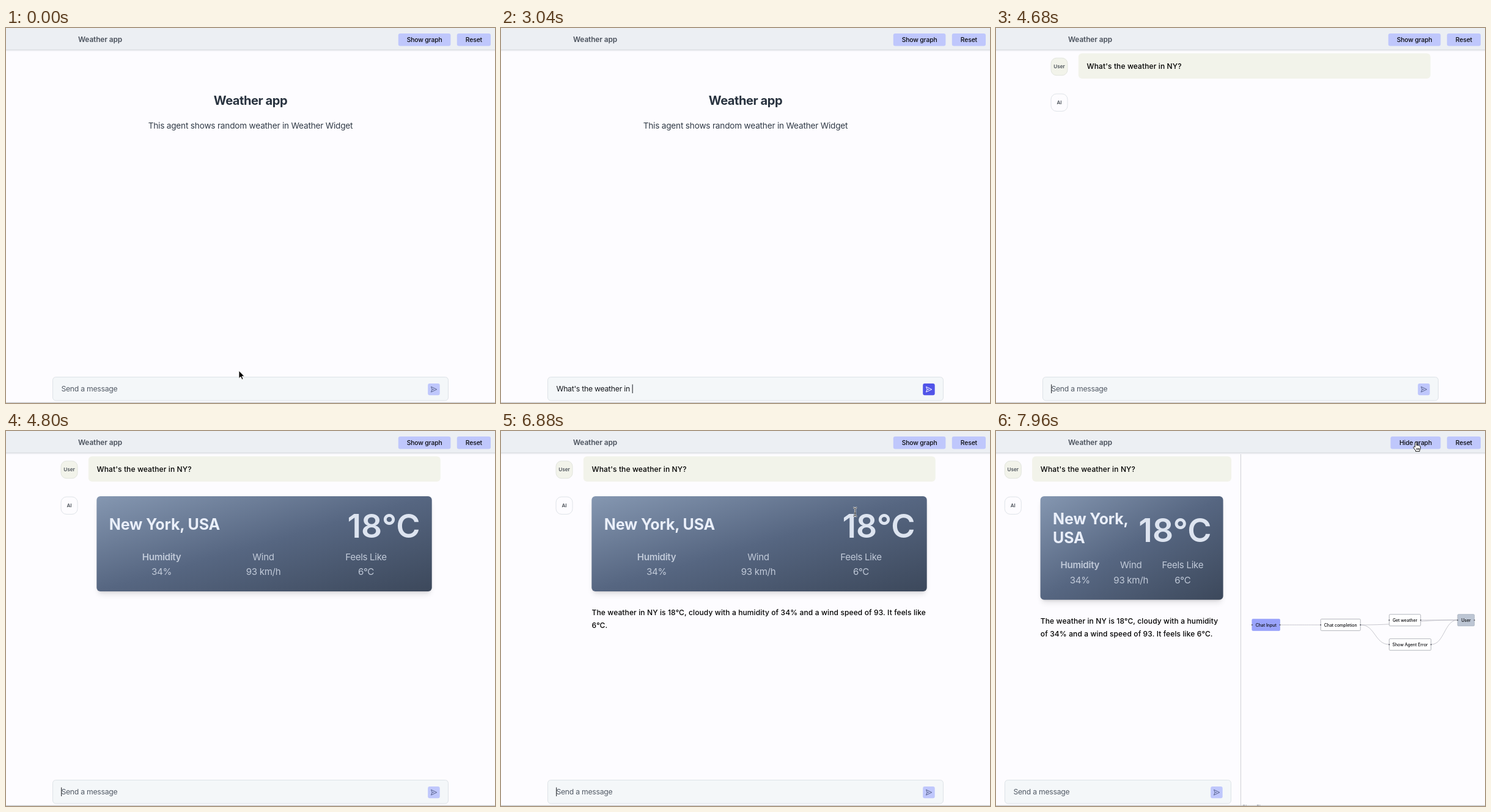
An HTML page that plays this animation: 800 px wide and 615 px high, repeating every 8 s.

```html
<!DOCTYPE html>
<html lang="en">
<head>
<meta charset="utf-8">
<title>Weather app</title>
<style>
html, body { margin: 0; width: 100%; height: 100%; overflow: hidden; background: #fdfcff; }
svg { display: block; width: 100%; height: 100%; }
text { font-family: Inter, sans-serif; white-space: pre; letter-spacing: -.02em; }
.title { letter-spacing: -.023em; }
.lead { letter-spacing: -.014em; }
.head { letter-spacing: -.006em; }
.body { letter-spacing: .12px; }
.btn { letter-spacing: -.015em; }
.tiny { letter-spacing: 0; }
.edge { fill: none; stroke: #b1b1b9; stroke-width: .7; }
.far { filter: blur(5px); }
.near { filter: blur(2px); }
</style>
</head>
<body>
<svg id="stage" viewBox="0 0 800 615" preserveAspectRatio="none"></svg>
<script>
const LOOP = 8000;
const FOCUS = 320, TYPE = 560, SUBMIT = 3680, AI = 3720, CARD = 4760, SPLIT = 7520;
const QUESTION = "What's the weather in NY?";
const WIDE_LINES = [
  'The weather in NY is 18°C, cloudy with a humidity of 34% and a wind speed of 93. It feels like',
  '6°C.'
];
const NARROW_LINES = [
  'The weather in NY is 18°C, cloudy with a humidity',
  'of 34% and a wind speed of 93. It feels like 6°C.'
];
const TYPING = [[TYPE, 0], [1280, 11], [1400, 11], [2600, 22], [3080, 22], [3440, 25]];
const STREAM = [[5680, 0], [6440, 22]];
const MOUSE = [
  [0, 381, 562], [FOCUS, 380, 588], [5000, 380, 588], [5560, 446.5, 315.5],
  [6240, 446.5, 315.5], [6880, 579, 133], [7280, 688, 22.4]
];

// y is the middle of the capital letters
const text = (x, y, s, size, o = {}) =>
  `<text x="${x}" y="${y + size * .364}" font-size="${size}" font-weight="${o.w || 400}"
    fill="${o.c || '#090a0d'}" text-anchor="${o.a || 'start'}" class="${o.k || ''}" id="${o.id || ''}">${s}</text>`;
const box = (x, y, w, h, r, fill, stroke = 'none', extra = '') =>
  `<rect x="${x}" y="${y}" width="${w}" height="${h}" rx="${r}" fill="${fill}" stroke="${stroke}" ${extra}/>`;
const group = (id, s) => `<g id="${id}">${s}</g>`;

const button = (x, w, label) =>
  box(x, 9, w, 20.5, 3.2, '#bfc7fc') + text(x + w / 2, 19.3, label, 10.4, { w: 500, a: 'middle', k: 'btn' });

const badge = (x, y, label, fill, stroke) =>
  box(x + .5, y + .5, 27, 28.5, 9, fill, stroke) +
  text(x + 14, y + 14.6, label, 8.1, { w: 600, c: '#4a5058', a: 'middle', k: 'tiny' });

function inputBar(id, x, w) {
  const b = x + w - 33.8;
  return group(id,
    box(x + .5, 572.5, w - 1, 38.5, 5, '#f4f7f9', '#dde3e7') +
    text(x + 14.4, 592, 'Send a message', 12.2, { c: '#535b66', id: id + 'Text' }) +
    box(b, 583, 19.5, 19.3, 3, '#bfc7fc', 'none', `id="${id}Send"`) +
    `<path id="${id}Icon" transform="translate(${b + 5} 588)" d="M.3.3 9.6 4.7.3 9.1 2 4.7ZM2 4.7H5.2"
      fill="none" stroke="#59638f" stroke-width="1" stroke-linejoin="round"/>`);
}

function weatherCard(id, x, w, h, titles, temp, cols, row) {
  const shadow = (dy, cls) => box(x + 2, 109 + dy, w - 4, h - 4, 6, '#000', 'none', `opacity=".1" class="${cls}"`);
  const label = (i, s, v, weight) =>
    text(cols[i], row, s, 15.1, { w: weight, c: '#c1cad9', a: 'middle' }) +
    text(cols[i], row + 24.4, v, 15.1, { c: '#c1cad9', a: 'middle' });
  return group(id,
    shadow(7, 'far') + shadow(2.75, 'near') +
    box(x, 107, w, h, 6, 'url(#sky)') +
    titles.map(([s, y]) => text(x + 20.5, y, s, 25, { w: 700, c: '#eaeffa', k: 'head' })).join('') +
    text(x + w - 19, temp, '18°C', 53.4, { w: 600, c: '#dde4f0', a: 'end', k: 'tiny' }) +
    label(0, 'Humidity', '34%', 600) + label(1, 'Wind', '93 km/h') + label(2, 'Feels Like', '6°C'));
}

function chat(id, x, bubbleW, card, lines, y) {
  const para = (s, py, lineId) => text(x + 59, py, s, 12, { w: 450, c: '#000', k: 'body', id: lineId });
  return group(id,
    badge(x, 48.7, 'User', '#f2f3ea', '#e2e5de') +
    box(x + 45.3, 41.5, bubbleW, 41.5, 6, '#f2f3ea') +
    para(QUESTION, 62.5) +
    group(id + 'Ai', badge(x, 107.5, 'AI', '#fdfcff', '#dfe3e8')) + card +
    lines.map((s, i) => para(s, y + i * 20.6, id + 'Line' + i)).join(''));
}

function graph() {
  const node = (x, y, w, s, fill = '#fff', stroke = '#a3a5ac') =>
    box(x, y, w, 19, 1.5, fill, stroke, 'stroke-width=".8"') +
    text(x + w / 2, y + 9.7, s, 6.9, { w: 450, c: '#0c0d10', a: 'middle', k: 'tiny' }) +
    [x, x + w].map(cx => `<circle cx="${cx}" cy="${y + 9.6}" r="1" fill="#53565e"/>`).join('');
  const edge = (x1, y1, x2, y2) => {
    const m = (x1 + x2) / 2;
    return `<path class="edge" d="M${x1} ${y1}C${m} ${y1} ${m} ${y2} ${x2} ${y2}"/>`;
  };
  return group('graph',
    box(400, 36, 1, 578, 0, '#d0d1d6') +
    edge(465, 318, 531, 318) + edge(597, 318, 755, 310) + edge(597, 318, 643, 350) +
    edge(695, 310, 755, 310) + edge(712, 350, 755, 310) +
    node(418.9, 308.4, 45.6, 'Chat Input', '#99a3fb', '#99a3fb') +
    node(531.2, 308.4, 65, 'Chat completion') +
    node(643.3, 300.7, 51.4, 'Get weather') +
    node(643.3, 340.7, 68.4, 'Show Agent Error') +
    node(755.2, 300.7, 27.4, 'User', '#bdc6d4', '#a5aebc') +
    text(403, 616.2, 'Show Fl', 8, { c: '#60636a', k: 'tiny' }));
}

const cursors =
  group('arrow', `<path d="M0 0V12.6L2.9 9.9 5 14.5 7.1 13.5 5.1 9.1H9Z" fill="#000" stroke="#fff" stroke-width=".9"/>`) +
  group('beam', ['#fff', '#222'].map((c, i) =>
    `<path d="M-3-7Q0-7 0-5Q0-7 3-7M0-5V5M-3 7Q0 7 0 5Q0 7 3 7M-1.5 2H1.5" fill="none" stroke="${c}" stroke-width="${i ? 1 : 2.4}"/>`).join('')) +
  group('hand', `<path d="M-2.5 4V-2.5Q-2.5-4-1.3-4T0-2.5V1Q1.2 0 2.2 1.4Q3.5.6 4.4 2Q6.4 1.4 6.4 3.4V6
    Q6.2 8 5 9.2V11H-1.5V9.6L-5 5.2Q-5.4 3.4-3.8 3.4ZM.4 5.5V8.6M2.4 5.5V8.6M4.2 5.5V8.6"
    fill="#fff" stroke="#111" stroke-width=".95" stroke-linejoin="round"/>`);

const stage = document.getElementById('stage');
stage.innerHTML =
  `<defs><linearGradient id="sky" x1="0" y1="0" x2="1" y2="1">
    <stop offset="0" stop-color="#8597b1"/><stop offset=".5" stop-color="#566681"/><stop offset="1" stop-color="#3c485b"/>
  </linearGradient></defs>` +
  box(0, 0, 800, 615, 0, '#fdfcff') +
  group('intro',
    text(400, 118.5, 'Weather app', 20.1, { w: 700, c: '#28323f', a: 'middle', k: 'title' }) +
    text(400, 159.8, 'This agent shows random weather in Weather Widget', 13.6, { c: '#303a46', a: 'middle', k: 'lead' })) +
  chat('wide', 89.5, 576,
    weatherCard('wideCard', 148.3, 548.4, 156, [['New York, USA', 153]], 155.5, [254.5, 421, 589], 206.4),
    WIDE_LINES, 298) +
  chat('narrow', 13.8, 326,
    weatherCard('narrowCard', 72.6, 299, 169.8, [['New York,', 144.2], ['USA', 175.2]], 162.3, [137.3, 220.7, 305.3], 220),
    NARROW_LINES, 312) +
  graph() +
  inputBar('bar', 76, 648) + inputBar('barNarrow', 14, 371) +
  box(90.2, 584.5, 1, 14.5, 0, '#15171c', 'none', 'id="caret"') +
  box(0, 613.8, 800, 1.2, 0, '#c4c5c9') +
  box(0, 36, 800, 2, 0, '#efeff3') + box(0, 35, 800, 1.2, 0, '#d7dade') + box(0, 0, 800, 35.2, 0, '#eceff3') +
  text(118, 19.2, 'Weather app', 11.8, { w: 600, c: '#4a515c', k: 'head' }) +
  group('showBtn', button(641.8, 85.6, 'Show graph')) +
  group('hideBtn', button(645.5, 81.9, 'Hide graph')) +
  button(737.8, 55.2, 'Reset') +
  group('mouse', cursors);

const el = {};
for (const n of stage.querySelectorAll('[id]')) if (n.id) el[n.id] = n;
const show = (id, on) => el[id].setAttribute('display', on ? 'inline' : 'none');

// linear interpolation through rows of [time, value...]
function track(rows, t) {
  if (t <= rows[0][0]) return rows[0].slice(1);
  const i = rows.findIndex(r => r[0] > t);
  if (i < 0) return rows[rows.length - 1].slice(1);
  const a = rows[i - 1], b = rows[i], k = (t - a[0]) / (b[0] - a[0]);
  return a.slice(1).map((v, j) => v + (b[j + 1] - v) * k);
}

function drawInput(t) {
  const typed = t < SUBMIT ? QUESTION.slice(0, Math.floor(track(TYPING, t)[0])) : '';
  el.barText.textContent = typed || 'Send a message';
  el.barText.setAttribute('fill', typed ? '#14171c' : '#535b66');
  el.barSend.setAttribute('fill', typed ? '#5154e8' : '#bfc7fc');
  el.barIcon.setAttribute('stroke', typed ? '#fff' : '#59638f');
  const blink = t < SUBMIT || (t - SUBMIT) % 1000 < 500;
  show('caret', t >= FOCUS && t < SPLIT && blink);
  el.caret.setAttribute('x', typed ? 91 + el.barText.getComputedTextLength() : 90.2);
}

function drawReply(t) {
  let left = Math.floor(track(STREAM, t)[0]);
  WIDE_LINES.forEach((line, i) => {
    const words = line.split(' ');
    el['wideLine' + i].textContent = words.slice(0, left).join(' ');
    left = Math.max(0, left - words.length);
  });
}

function drawMouse(t) {
  const [x, y] = track(MOUSE, t);
  const hand = y < 31 && x > 642;
  const beam = !hand && (y > 574 || (t > CARD && y > 120 && y < 245));
  show('mouse', t < TYPE || t >= 5000);
  el.mouse.setAttribute('transform', `translate(${x} ${y})`);
  show('hand', hand);
  show('beam', beam);
  show('arrow', !hand && !beam);
}

function render(t) {
  const split = t >= SPLIT;
  show('intro', t < SUBMIT);
  show('wide', t >= SUBMIT && !split);
  show('wideAi', t >= AI);
  show('wideCard', t >= CARD);
  for (const id of ['narrow', 'graph', 'barNarrow', 'hideBtn']) show(id, split);
  for (const id of ['bar', 'showBtn']) show(id, !split);
  drawInput(t);
  drawReply(t);
  drawMouse(t);
}

const start = performance.now();
function frame() {
  render((performance.now() - start) % LOOP);
  requestAnimationFrame(frame);
}
frame();
</script>
</body>
</html>
```
